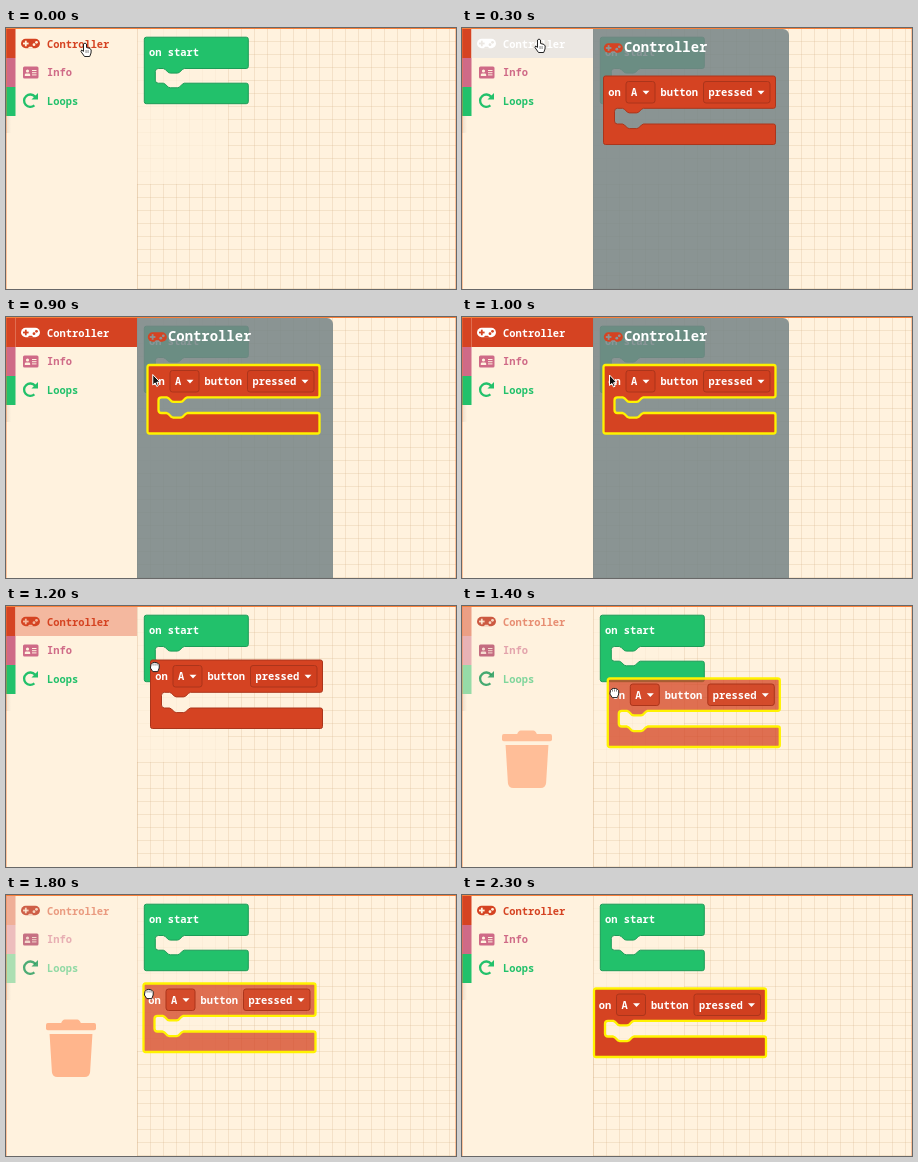
Write an HTML page with a canvas that moves like this. It is 450 by 261 pixels and loops after 4300 ms.

```html
<!DOCTYPE html>
<html lang="en">
<head>
<meta charset="utf-8">
<title>Dragging a block</title>
<style>
html, body { margin: 0; width: 100%; height: 100%; overflow: hidden; background: #fff2de; }
canvas { display: block; width: 450px; height: 261px; }
</style>
</head>
<body>
<canvas id="stage" width="450" height="261"></canvas>
<script>
const ctx = document.getElementById('stage').getContext('2d');
const LOOP = 4300, STEP = 100, LAST = 23;
const BG = '#fff2de', RED = '#d54322', PINK = '#cf6a87', GREEN = '#22c16b', YELLOW = '#fff200';
const FONT = '"Noto Sans Mono", "DejaVu Sans Mono", monospace';

// Keys: [step, x, y]
const BLOCK = [[10, 141.5, 48], [11, 143, 50.5], [12, 144.5, 54], [14, 145.8, 72.5],
  [16, 142, 83], [18, 137.5, 88.5], [20, 132, 93.5], [23, 132, 93.5]];
const CURSOR = [[0, 80, 22], [1, 78, 18], [5, 78, 18], [8, 146, 57], [10, 147.5, 58],
  [11, 148, 60], [12, 149, 61], [14, 152.5, 87], [16, 149, 95], [18, 143, 99],
  [19, 141, 102], [20, 146, 125], [22, 165, 205]];

function at(keys, k) {
  if (k <= keys[0][0]) return keys[0].slice(1);
  for (let i = 1; i < keys.length; i++) {
    const a = keys[i - 1], b = keys[i];
    if (k <= b[0]) {
      const u = (k - a[0]) / (b[0] - a[0]);
      return [a[1] + (b[1] - a[1]) * u, a[2] + (b[2] - a[2]) * u];
    }
  }
  return keys[keys.length - 1].slice(1);
}

function rect(x, y, w, h, color) {
  ctx.fillStyle = color;
  ctx.fillRect(x, y, w, h);
}

function round(x, y, w, h, r, color) {
  ctx.beginPath();
  ctx.roundRect(x, y, w, h, r);
  ctx.fillStyle = color;
  ctx.fill();
}

function dot(x, y, r, color) {
  ctx.beginPath();
  ctx.arc(x, y, r, 0, Math.PI * 2);
  ctx.fillStyle = color;
  ctx.fill();
}

function text(str, x, y, color, size = 10.4, weight = 600) {
  ctx.font = `${weight} ${size}px ${FONT}`;
  ctx.fillStyle = color;
  ctx.fillText(str, x, y);
}

function placed(x, y, draw) {
  ctx.save();
  ctx.translate(x, y);
  draw();
  ctx.restore();
}

function grid() {
  const line = 'rgba(214,180,140,0.27)', faint = 'rgba(214,180,140,0.07)';
  for (let x = 131; x < 450; x += 13) {
    rect(x, 1, 1, 155, x < 222 ? faint : line);
    rect(x, 156, 1, 105, line);
  }
  for (let y = 13; y < 261; y += 13) {
    rect(131, y, 91, 1, y < 156 ? faint : line);
    rect(222, y, 228, 1, line);
  }
}

function gamepad(x, y, color, hole) {
  placed(x, y, () => {
    round(-9.5, -4.7, 19, 9.4, 4.7, color);
    ctx.beginPath();
    ctx.moveTo(-3, 5);
    ctx.lineTo(-1.4, 3.2);
    ctx.lineTo(1.4, 3.2);
    ctx.lineTo(3, 5);
    ctx.fillStyle = hole;
    ctx.fill();
    rect(-7.5, -0.9, 5.6, 1.8, hole);
    rect(-5.6, -2.8, 1.8, 5.6, hole);
    dot(3.5, 1.2, 1.4, hole);
    dot(6, -1.2, 1.4, hole);
  });
}

function idCard(color, hole) {
  round(17, 38.5, 15.5, 12, 1.5, color);
  dot(21.5, 43, 1.6, hole);
  round(18.8, 45.4, 5.4, 2.6, [1.4, 1.4, 0, 0], hole);
  rect(26, 42, 4.5, 1, hole);
  rect(26, 44.2, 4.5, 1, hole);
  rect(26, 46.4, 4.5, 1, hole);
}

function redo(color) {
  ctx.beginPath();
  ctx.arc(24.3, 72.7, 6.2, 0.85, Math.PI * 2 - 0.65);
  ctx.strokeStyle = color;
  ctx.lineWidth = 2.3;
  ctx.stroke();
  ctx.beginPath();
  ctx.moveTo(32, 65);
  ctx.lineTo(32, 71.5);
  ctx.lineTo(25.5, 71.5);
  ctx.closePath();
  ctx.fillStyle = color;
  ctx.fill();
}

function trash(alpha) {
  ctx.save();
  ctx.globalAlpha = alpha;
  ctx.translate(40, 124.5);
  ctx.scale(50 / 448, 57.5 / 512);
  round(0, 32, 448, 64, 16, '#ffb58c');
  ctx.beginPath();
  ctx.moveTo(136, 32);
  ctx.quadraticCurveTo(148, 0, 167, 0);
  ctx.lineTo(281, 0);
  ctx.quadraticCurveTo(300, 0, 312, 32);
  ctx.moveTo(32, 128);
  ctx.lineTo(53, 467);
  ctx.quadraticCurveTo(58, 512, 101, 512);
  ctx.lineTo(347, 512);
  ctx.quadraticCurveTo(390, 512, 395, 467);
  ctx.lineTo(416, 128);
  ctx.fill();
  ctx.restore();
}

// fade: 0 normal, 1 dimmed while a block is dragged
function toolbox(k, fade) {
  rect(0, 1, 131, 260, BG);
  rect(131, 1, 1, 260, 'rgba(214,180,140,0.3)');
  const shade = ctx.createLinearGradient(0, 0, 5, 0);
  shade.addColorStop(0, 'rgba(120,110,100,0.16)');
  shade.addColorStop(1, 'rgba(120,110,100,0)');
  rect(0, 88, 5, 17, shade);

  ctx.globalAlpha = 1 - 0.62 * fade;
  [RED, PINK, GREEN].forEach((c, i) => rect(0, 1 + i * 29, 9.5, 29, c));
  ctx.globalAlpha = 1;

  let row = null, ink = RED;
  if (k >= 1 && k <= 3) row = '#ebe7e2';
  if (k === 4) row = '#e08f7b';
  if (k >= 5 && k <= 11) row = RED;
  if (k === 12) row = '#f4b89f';
  if (k >= 2 && k <= 11) ink = '#fff';
  if (row) rect(9.5, 1, 121.5, 29, row);

  ctx.globalAlpha = 1 - 0.2 * fade;
  gamepad(24.5, 15.5, fade ? '#c23a20' : ink, row || BG);
  idCard(fade ? '#b8506c' : PINK, BG);
  redo(fade ? '#1f9a5a' : GREEN);
  ctx.globalAlpha = 1 - 0.5 * fade;
  text('Controller', 41, 19.5, ink);
  text('Info', 41, 48.2, PINK);
  text('Loops', 41, 77, GREEN);
  ctx.globalAlpha = 1;
}

// C-shaped block: header, mouth with notches, foot
function blockPath(w, head, foot, h) {
  ctx.beginPath();
  ctx.moveTo(2, 0);
  ctx.lineTo(w - 2, 0);
  ctx.quadraticCurveTo(w, 0, w, 2);
  ctx.lineTo(w, head - 2);
  ctx.quadraticCurveTo(w, head, w - 2, head);
  for (const [x, y] of [[40, 0], [38, 1], [35, 4], [33, 4.6], [26, 4.6], [24, 4], [21, 1], [19, 0], [14, 0]])
    ctx.lineTo(x, head + y);
  ctx.quadraticCurveTo(11, head, 11, head + 3);
  ctx.lineTo(11, foot - 3);
  ctx.quadraticCurveTo(11, foot, 14, foot);
  for (const [x, y] of [[19, 0], [21, 1], [24, 4], [26, 4.6], [33, 4.6], [35, 4], [38, 1], [40, 0]])
    ctx.lineTo(x, foot + y);
  ctx.lineTo(w - 2, foot);
  ctx.quadraticCurveTo(w, foot, w, foot + 2);
  ctx.lineTo(w, h - 2);
  ctx.quadraticCurveTo(w, h, w - 2, h);
  ctx.lineTo(2, h);
  ctx.quadraticCurveTo(0, h, 0, h - 2);
  ctx.lineTo(0, 2);
  ctx.quadraticCurveTo(0, 0, 2, 0);
  ctx.closePath();
}

function paint(fill, edge, width, alpha = 1) {
  ctx.globalAlpha = alpha;
  ctx.fillStyle = fill;
  ctx.fill();
  ctx.globalAlpha = 1;
  ctx.strokeStyle = edge;
  ctx.lineWidth = width;
  ctx.lineJoin = 'round';
  ctx.stroke();
}

function startBlock() {
  placed(138.3, 9.2, () => {
    blockPath(104, 31.3, 46, 66.5);
    paint(GREEN, '#1b9c57', 1);
    text('on start', 4.7, 19, '#fff');
  });
}

function dropdown(x, w, label, alpha) {
  ctx.beginPath();
  ctx.roundRect(x, 5.5, w, 21.5, 2.5);
  paint('#d03f1f', '#ab351b', 1, alpha);
  text(label, x + 5, 20, '#fff');
  const a = x + w - 12.5;
  ctx.beginPath();
  ctx.moveTo(a, 14.8);
  ctx.lineTo(a + 7, 14.8);
  ctx.lineTo(a + 3.5, 18.4);
  ctx.fill();
}

function eventBlock(x, y, selected, alpha) {
  placed(x, y, () => {
    blockPath(172, 32.3, 48, 68.5);
    paint(RED, selected ? YELLOW : '#ab351b', selected ? 2.3 : 1, alpha);
    text('on', 4.7, 20, '#fff');
    dropdown(22.5, 29, 'A', alpha);
    text('button', 57, 20, '#fff');
    dropdown(100, 66.5, 'pressed', alpha);
  });
}

function flyout(selected) {
  round(131, 1, 196, 260, [0, 6, 0, 0], 'rgba(119,133,136,0.86)');
  gamepad(151.3, 20, RED, '#8b9595');
  text('Controller', 162, 24.3, '#fff', 13.9);
  eventBlock(141.5, 48, selected, 1);
}

function outline(points, fill, edge) {
  ctx.beginPath();
  points.forEach(([x, y]) => ctx.lineTo(x, y));
  ctx.closePath();
  paint(fill, edge, 1);
}

function pointer(x, y) {
  placed(x, y, () => {
    outline([[-2.5, -6], [-1, -7], [0.5, -6], [0.5, -2.5], [4, -1.6], [5.2, 0], [5, 3],
      [3.7, 6.5], [-1.5, 6.5], [-5, 1.6], [-4.4, 0], [-2.5, 1.4]], '#fff', '#222');
    rect(1.7, 0, 0.7, 3, '#555');
    rect(-0.3, 0, 0.7, 3, '#555');
  });
}

function arrow(x, y) {
  placed(x, y, () => outline([[0, 0], [0, 10.5], [2.4, 8.4], [4, 12], [5.6, 11.2],
    [4.1, 7.8], [7.2, 7.5]], '#111', '#fff'));
}

function grab(x, y) {
  placed(x, y, () => {
    outline([[-4, -2.5], [-2.5, -4.2], [-0.8, -4.6], [1, -4.5], [2.8, -3.8], [4.2, -2.3],
      [4.2, 1], [2.8, 4.6], [-2.2, 4.6], [-4.6, 1]], '#fff', '#222');
    for (let i = -1; i < 2; i++) rect(i * 2 - 0.3, -3.6, 0.7, 2.2, '#555');
  });
}

function cursor(k) {
  if (k === LAST) return;
  const [x, y] = at(CURSOR, k);
  const draw = k < 8 ? pointer : k < 11 || k > 20 ? arrow : grab;
  draw(x, y);
}

function dimming(k) {
  if (k < 13 || k > 21) return 0;
  if (k === 13) return 0.5;
  if (k < 20) return k < 16 ? 0.85 : 1;
  return k === 20 ? 0.6 : 0.25;
}

function render(k) {
  const fade = dimming(k);
  rect(0, 0, 450, 261, BG);
  grid();
  startBlock();
  toolbox(k, fade);
  if (fade) trash(fade);
  if (k >= 2 && k <= 10) flyout(k >= 8);
  if (k >= 11) {
    const [x, y] = at(BLOCK, k);
    eventBlock(x, y, k >= 13, k >= 13 && k < 20 ? 0.75 : 1);
  }
  rect(0, 0, 450, 1, '#f9803a');
  rect(0, 1, 1, 260, 'rgba(249,128,58,0.4)');
  rect(449, 1, 1, 260, 'rgba(249,128,58,0.4)');
  cursor(k);
}

const begin = performance.now();
function tick() {
  const ms = (performance.now() - begin) % LOOP;
  render(Math.min(LAST, Math.floor(ms / STEP)));
  requestAnimationFrame(tick);
}
tick();
</script>
</body>
</html>
```
